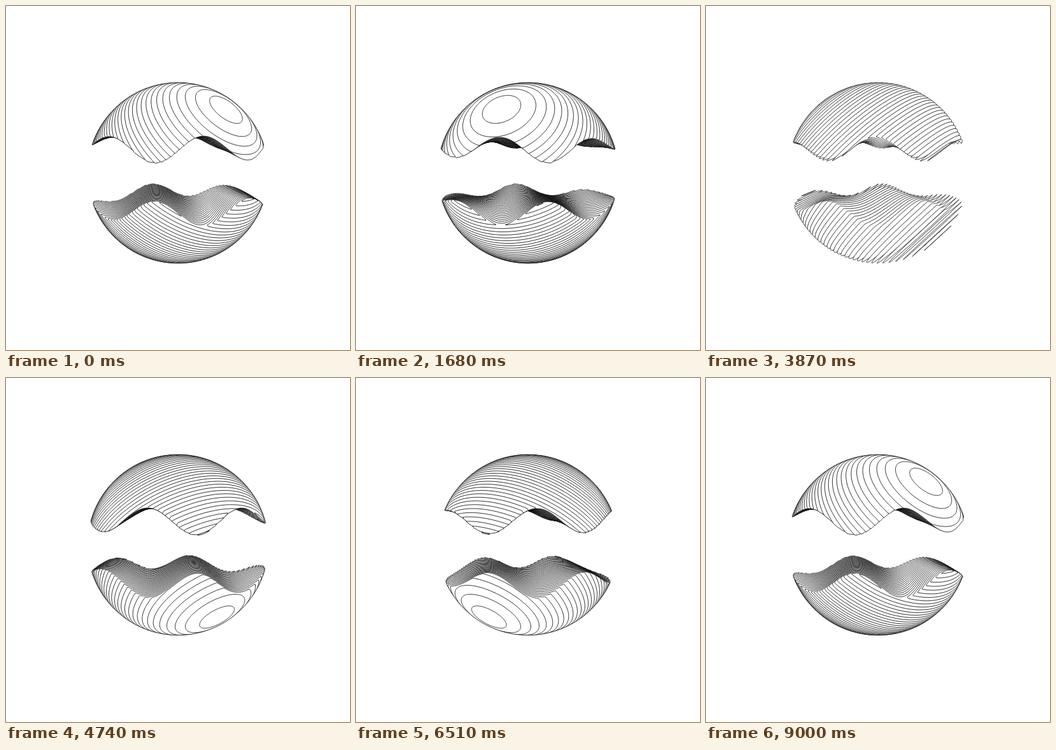
Animation, 540 px wide and 540 px high, one loop 9.03 s. Source, as an HTML page with a canvas:

```html
<!DOCTYPE html>
<html lang="en">
<head>
<meta charset="utf-8">
<title>Sliced sphere</title>
<style>
  html, body { margin: 0; width: 100%; height: 100%; overflow: hidden; background: #fff; }
  canvas { display: block; width: 540px; height: 540px; }
</style>
</head>
<body>
<canvas id="stage" width="540" height="540"></canvas>
<script>
const ctx = document.getElementById('stage').getContext('2d');
const TAU = Math.PI * 2;
const CX = 270, CY = 262, R = 139.6;
const SLICES = 50, COLUMNS = 90;
const STEP = 30, STEPS = 301;

// Perspective camera that looks slightly down on the sphere.
const DISTANCE = 800;
const TILT = 5.4 * Math.PI / 180, COS = Math.cos(TILT), SIN = Math.sin(TILT);

const GAP = 43, WAVE = 130, K = TAU / WAVE;

function project([x, y, z]) {
  const f = DISTANCE / (DISTANCE - z * COS + y * SIN);
  return [CX + x * f, CY + (y * COS + z * SIN) * f];
}

// Slices lean 45 degrees and turn once per loop about the upright axis.
function sliceFrame(p) {
  const turn = TAU * (0.125 - p);
  const s = Math.sin(turn), c = Math.cos(turn), h = Math.SQRT1_2;
  return {
    normal: [h * s, -h, h * c],
    across: [c, 0, -s],
    down: [h * s, h, h * c]
  };
}

// Half the opening between the two bodies: ripples differ at front and back.
function halfGap(x, z, p) {
  const front = (1 + z / R) / 2;
  const near = 18 * Math.cos(K * (x - 35 + 3 * WAVE * p));
  const far = -11 * Math.cos(K * (x + 48 - WAVE * p));
  return GAP + front * near + (1 - front) * far;
}

function drawRun(run) {
  if (run.length < 2) return;
  ctx.beginPath();
  run.forEach(c => ctx.lineTo(...c.from));
  run.reverse().forEach(c => ctx.lineTo(...c.to));
  ctx.closePath();
  ctx.fill();
  ctx.stroke();
}

// One part of a disc; sign is -1 for the upper body and 1 for the lower.
function drawPart({ normal, across, down }, d, sign, p) {
  const r = Math.sqrt(R * R - d * d);
  const at = (u, v) => normal.map((n, i) => n * d + across[i] * u + sign * down[i] * v);
  const isSolid = (u, v) => {
    const [x, y, z] = at(u, v);
    return sign * y > halfGap(x, z, p);
  };

  const cutEdge = (u, w) => {
    if (isSolid(u, -w)) return -w;
    let lo = -w, hi = w;
    for (let i = 0; i < 12; i++) {
      const mid = (lo + hi) / 2;
      if (isSolid(u, mid)) hi = mid; else lo = mid;
    }
    return hi;
  };

  let run = [];
  for (let i = 0; i <= COLUMNS; i++) {
    const angle = (i / COLUMNS - 0.5) * Math.PI;
    const u = r * Math.sin(angle), w = r * Math.cos(angle);
    if (isSolid(u, w)) {
      run.push({ from: project(at(u, w)), to: project(at(u, cutEdge(u, w))) });
    } else {
      drawRun(run);
      run = [];
    }
  }
  drawRun(run);
}

function draw(p) {
  ctx.fillStyle = '#fff';
  ctx.fillRect(0, 0, 540, 540);
  ctx.strokeStyle = '#000';
  ctx.lineWidth = 0.8;
  ctx.lineJoin = 'round';

  const frame = sliceFrame(p);
  const eye = DISTANCE * (frame.normal[2] * COS - frame.normal[1] * SIN);

  // Slices farthest from the eye's own plane come first.
  const depths = Array.from({ length: SLICES }, (_, i) => R * ((2 * i + 1) / SLICES - 1));
  depths.sort((a, b) => Math.abs(b - eye) - Math.abs(a - eye));
  for (const d of depths) {
    drawPart(frame, d, -1, p);
    drawPart(frame, d, 1, p);
  }
}

const start = performance.now();
let shown = -1;
function tick() {
  const step = Math.floor((performance.now() - start) / STEP) % STEPS;
  if (step !== shown) {
    shown = step;
    draw(step / (STEPS - 1));
  }
  requestAnimationFrame(tick);
}
tick();
</script>
</body>
</html>
```
